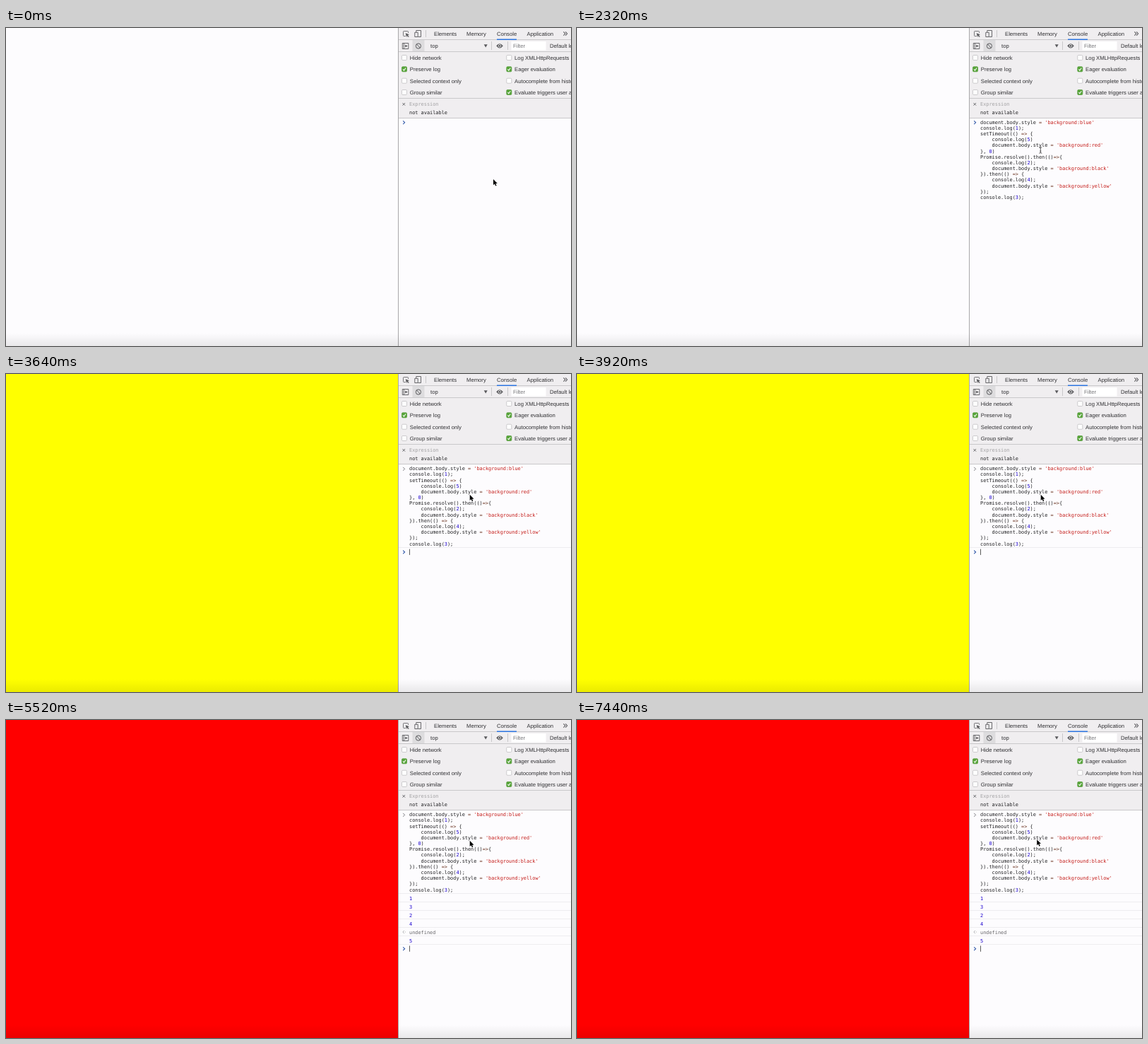
An HTML page for the animation above (7.48 s loop, 800 by 450 pixels).

```html
<!DOCTYPE html>
<html lang="en">
<head>
<meta charset="utf-8">
<title>Console</title>
<style>
html, body { margin: 0; width: 100%; height: 100%; overflow: hidden; background: #fdfcfe; }
svg { display: block; width: 800px; height: 450px; }
text { white-space: pre; text-rendering: geometricPrecision; }
.ui { font: 7.7px "Liberation Sans", Arial, sans-serif; fill: #303033; }
.mono { font: 6.9px "DejaVu Sans Mono", monospace; fill: #202022; }
.mono .str { fill: #c41a16; }
.mono .num { fill: #1c00cf; }
.mono .op { fill: #6b3320; }
.line { stroke: #c9c8ca; fill: none; }
.row { stroke: #eeedf0; }
.icon { stroke: #59595c; fill: none; }
</style>
</head>
<body>
<svg viewBox="0 0 800 450">
  <defs>
    <linearGradient id="shade" x2="0" y2="1">
      <stop offset="0" stop-opacity="0"/><stop offset="1" stop-opacity=".08"/>
    </linearGradient>
  </defs>
  <rect id="page" width="555" height="450"/>
  <rect x="555" width="245" height="450" fill="#fdfcfe"/>
  <rect x="555" width="245" height="127" fill="#f0eef0"/>
  <g id="chrome"></g>
  <g id="code" class="mono"></g>
  <g id="output" class="mono"></g>
  <g id="prompt">
    <path d="M562.2 -2.4l2.4 2.4-2.4 2.4" fill="none" stroke="#3158a8" stroke-width="1.1"/>
    <path id="caret" d="M571.5 -4.3v8.4" stroke="#333" stroke-width=".8"/>
  </g>
  <path d="M555.5 0V450" stroke="#a9a8aa"/>
  <rect y="432" width="800" height="18" fill="url(#shade)"/>
  <path id="arrow" d="M0 0V8.2L1.9 6.4 3.2 9.5 4.6 8.9 3.3 5.9H5.8Z" fill="#000" stroke="#fff" stroke-width=".7" paint-order="stroke"/>
  <path id="beam" d="M-2 -4.2Q0 -4.2 0 -3 0 -4.2 2 -4.2M0 -3V3M-2 4.2Q0 4.2 0 3 0 4.2 2 4.2M-1 1.2H1" fill="none" stroke="#333" stroke-width=".8"/>
</svg>
<script>
const LOOP = 7480, STEP = 40;
const PASTE = 480, HIDE_POINTER = 3320, RUN = 3640, TURN_RED = 3960, LOG = 4960;
const $ = id => document.getElementById(id);
const show = (id, on) => $(id).setAttribute('visibility', on ? 'visible' : 'hidden');
const place = (id, x, y) => $(id).setAttribute('transform', `translate(${x} ${y})`);
const escape = s => s.replace(/&/g, '&amp;').replace(/</g, '&lt;').replace(/>/g, '&gt;');
const label = (x, y, s, attrs = '') => `<text class="ui" x="${x}" y="${y}" ${attrs}>${s}</text>`;
const mono = (x, y, s, attrs = '') => `<text class="mono" x="${x}" y="${y}" ${attrs}>${s}</text>`;
const path = (d, cls = 'icon', attrs = '') => `<path class="${cls}" d="${d}" ${attrs}/>`;

function checkbox(x, y, text, on) {
  const fill = on ? '#58a53a' : '#fff', stroke = on ? '#4c9632' : '#b9b8ba';
  return `<rect x="${x - 3.5}" y="${y - 3.5}" width="7" height="7" rx="1.3" fill="${fill}" stroke="${stroke}" stroke-width=".7"/>` +
    (on ? path(`M${x - 1.9} ${y + .1}l1.4 1.6 2.5-3.5`, '', 'fill="none" stroke="#fff" stroke-width="1.1"') : '') +
    label(x + 7.8, y + 2.8, text);
}

$('chrome').innerHTML = [
  path('M556 16.5H800M556 33.5H800M556 99.5H800M556 127.5H800', 'line'),
  path('M594.5 3V13M687.5 19V31M710.5 19V31', 'line'),
  '<rect x="695" y="15.5" width="28" height="1.5" fill="#2b74e0"/>',
  ...[[606, 'Elements'], [652, 'Memory'], [695, 'Console'], [737.5, 'Application']].map(([x, s]) => label(x, 10.8, s)),
  // Inspect and device icons
  path('M566 11.5H563.3Q562.5 11.5 562.5 10.7V5.3Q562.5 4.5 563.3 4.5H568.7Q569.5 4.5 569.5 5.3V7', 'icon', 'stroke-width=".8"'),
  path('M565.7 7.2L570.9 9.3 568.9 10.2 570.7 12 569.8 12.9 568 11.1 567.2 12.9Z', '', 'fill="#59595c"'),
  path('M580.8 6V3.5H587.5V12.5H583.5M578.8 6.3H583.2V12.5H578.8Z', 'icon', 'stroke-width=".9"'),
  path('M789.4 5.4l2.4 2.6-2.4 2.6M792.2 5.4l2.4 2.6-2.4 2.6', 'icon', 'stroke-width="1.1"'),
  // Sidebar toggle and clear button
  '<rect x="575.5" y="17" width="17" height="16" fill="#dddcde"/>',
  path('M561.3 21.5H569.8V29.5H561.3ZM563.4 21.5V29.5', 'icon', 'stroke-width=".9"'),
  path('M565.2 23.4V27.6L568.6 25.5Z', '', 'fill="#59595c"'),
  path('M587.5 25.5a3.6 3.6 0 1 1-7.2 0 3.6 3.6 0 1 1 7.2 0M581.4 23l5 5', 'icon'),
  label(601, 27.8, 'top'),
  path('M676.7 23.2H681.7L679.2 27.5Z', '', 'fill="#59595c"'),
  path('M694.2 25.3Q699 19 703.8 25.3 699 31.6 694.2 25.3Z', '', 'fill="#59595c"'),
  '<circle cx="699" cy="25.3" r="1.8" fill="#59595c" stroke="#fff" stroke-width=".8"/>',
  '<rect x="715.5" y="19" width="49" height="12.5" fill="#fff"/>',
  label(718, 27.8, 'Filter', 'style="fill:#77777a"'),
  label(770, 27.8, 'Default levels'),
  checkbox(564, 42, 'Hide network'),
  checkbox(564, 58.3, 'Preserve log', true),
  checkbox(564, 74.7, 'Selected context only'),
  checkbox(564, 91, 'Group similar'),
  checkbox(712.3, 42, 'Log XMLHttpRequests'),
  checkbox(712.3, 58.3, 'Eager evaluation', true),
  checkbox(712.3, 74.7, 'Autocomplete from history'),
  checkbox(712.3, 91, 'Evaluate triggers user activation', true),
  path('M561.5 106l3.6 3.6M565.1 106l-3.6 3.6', 'icon', 'stroke-width=".9"'),
  mono(571, 110, 'Expression', 'style="fill:#a3a2a4"'),
  mono(571, 121.5, 'not available')
].join('');

const source = `document.body.style = 'background:blue'
console.log(1);
setTimeout(() => {
    console.log(5)
    document.body.style = 'background:red'
}, 0)
Promise.resolve().then(()=>{
    console.log(2);
    document.body.style = 'background:black'
}).then(() => {
    console.log(4);
    document.body.style = 'background:yellow'
});
console.log(3);`;

const highlight = line => line.replace(/('[^']*')|(\d)|(=>?)|[<>&]/g, (m, str, num, op) => {
  const cls = str ? 'str' : num ? 'num' : op ? 'op' : '';
  return `<tspan class="${cls}">${escape(m)}</tspan>`;
});
$('code').innerHTML = source.split('\n')
  .map((line, i) => mono(571, 135.7 + i * 8.17, highlight(line))).join('');

$('output').innerHTML = ['1', '3', '2', '4', 'undefined', '5'].map((value, i) => {
  const y = 252 + i * 12, isResult = value === 'undefined';
  return path(`M556 ${y + 5.5}H800`, 'row') +
    mono(571, y + 2.6, isResult ? value : `<tspan class="num">${value}</tspan>`, isResult ? 'style="fill:#69686b"' : '') +
    (isResult ? path(`M564 ${y - 2}l-2.2 2 2.2 2M565 ${y}h.9`, '', 'fill="none" stroke="#a3a2a6" stroke-width=".8"') : '');
}).join('');

// Echoed command marker and the first separator, shown once the code has run
$('chrome').insertAdjacentHTML('beforeend',
  `<g id="echo">${path('M562.2 131.9l2.4 2.4-2.4 2.4', '', 'fill="none" stroke="#77777c" stroke-width="1"')}${path('M556 245.5H800', 'row')}</g>`);

const progress = (t, from, to) => Math.min(1, Math.max(0, (t - from) / (to - from)));
const mix = (a, b, k) => a + (b - a) * k;

function draw(now) {
  const t = Math.floor(now % LOOP / STEP) * STEP;
  const pasted = t >= PASTE, ran = t >= RUN, logged = t >= LOG;

  $('page').setAttribute('fill', t >= TURN_RED ? '#ff0000' : ran ? '#ffff00' : '#fdfcfe');
  show('code', pasted);
  place('code', 0, ran ? .6 : 0);
  show('echo', ran);
  show('output', logged);
  show('caret', ran);
  place('prompt', 0, logged ? 323.7 : ran ? 252 : 133.8);

  show('arrow', !pasted || ran);
  show('beam', pasted && t < HIDE_POINTER);
  const k = progress(t, 0, 760), ease = k * k * (3 - 2 * k);
  const x = mix(690, 656.3, ease), y = mix(214, 173, ease);
  place('beam', x, y);
  if (ran) {
    const drift = progress(t, 7280, 7440);
    place('arrow', mix(656.7, 651.2, drift), mix(170.8, 169.2, drift));
  } else {
    place('arrow', x, y);
  }
}

function tick() {
  draw(performance.now());
  requestAnimationFrame(tick);
}
tick();
</script>
</body>
</html>
```
